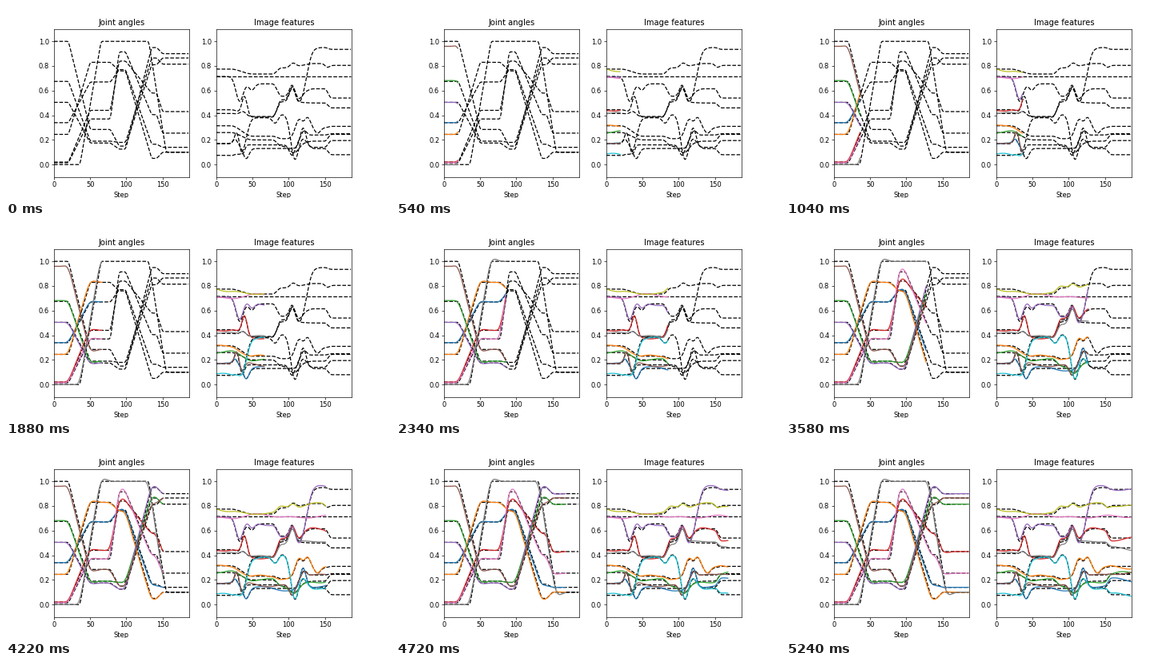
A matplotlib script for the animation above (5.34 s loop, 480 by 240 pixels).

```python
import numpy as np
import matplotlib.pyplot as plt
from matplotlib.animation import FuncAnimation

N = 187
t = np.arange(N)
rng = np.random.default_rng(4)

# Step ranges in which the arm moves; it rests in between.
ARM = (20, 50), (78, 90), (99, 135), (142, 150)
LATE = (36, 65), (131, 155)
VIEW = ARM[:3] + ((150, 159),)


def linear(u):
    return u


def smooth(u):
    return u * u * (3 - 2 * u)


def track(poses, spans, ease):
    """Go from pose to pose, one span per move, with soft corners."""
    y = np.full(N, float(poses[0]))
    for (a, b), p, q in zip(spans, poses, poses[1:]):
        y += (q - p) * ease(np.clip((t - a) / (b - a), 0, 1))
    win = np.hanning(7)[1:-1]
    return np.convolve(np.pad(y, 2, mode="edge"), win / win.sum(), "valid")


def joint(*poses, spans=ARM, start=0):
    goal = track(poses, spans, linear)
    offset = start * (1 - smooth(np.clip((t - 8) / 40, 0, 1)))
    return goal, spring(goal) + offset


def spring(goal, omega=.25, zeta=.6):
    """Follow the goal with a little overshoot, its lag taken out."""
    lag = round(2 * zeta / omega)
    pos, vel, out = goal[0], 0, []
    for g in np.pad(goal, (0, lag), mode="edge"):
        vel += omega ** 2 * (g - pos) - 2 * zeta * omega * vel
        pos += vel
        out.append(pos)
    return np.array(out[lag:])


def feature(*poses, bumps=()):
    """Poses plus bumps given as (centre, width, height)."""
    goal = track(poses, VIEW, smooth)
    for c, w, h in bumps:
        goal += h * np.exp(-((t - c) / w) ** 2 / 2)
    return goal, goal + wander()


def wander(size=.008):
    """Slow random error."""
    phase = rng.uniform(0, 2 * np.pi, 3)
    return size * sum(np.sin(t / (8 + 6 * i) + p) for i, p in enumerate(phase))


joints = [
    joint(.34, .67, .77, .165, .14),
    joint(.245, .83, .76, .05, .10),
    joint(.675, .19, .18, .865, .815, start=.007),
    joint(.02, .44, .84, .58, .43),
    joint(.505, .175, .125, .95, .90),
    joint(1, .285, .15, .81, .865, start=-.04),
    joint(.015, .37, .915, .405, .255),
    joint(0, 1, .1, spans=LATE),
]

features = [
    feature(.17, .13, .13, .14, .195, bumps=[(26, 3, .04), (41, 4, -.09), (120, 4, .16)]),
    feature(.315, .23, .21, .30, .31, bumps=[(114, 5, .12), (126, 4, .09), (140, 4, -.045)]),
    feature(.26, .20, .15, .19, .245, bumps=[(108, 6, -.06)]),
    feature(.445, .385, .525, .615, .54, bumps=[(39, 3.5, .15), (105, 4, .1), (115, 4, -.03)]),
    feature(.715, .655, .555, .95, .935,
            bumps=[(32, 5, -.18), (49, 4, -.05), (105, 4, .12), (118, 8, -.23)]),
    feature(.17, .16, .16, .24, .25,
            bumps=[(28, 3, .09), (36, 3, -.08), (105, 4, -.09), (121, 4, .06)]),
    feature(.715, .715),
    feature(.415, .39, .51, .50, .46, bumps=[(37, 4, .03), (105, 4, .11)]),
    feature(.775, .735, .785, .82, .805, bumps=[(106, 4, .035), (153, 3, -.025)]),
    feature(.075, .38, .41, .13, .08, bumps=[(37, 6, -.14), (82, 4, -.05), (108, 5.5, -.32)]),
]

fig, axes = plt.subplots(1, 2, figsize=(8, 4), dpi=60)
paths = []

for ax, title, data in zip(axes, ("Joint angles", "Image features"), (joints, features)):
    ax.set(title=title, xlabel="Step")
    for goal, _ in data:
        ax.plot(t, goal, "k--")
    for _, path in data:
        line, = ax.plot([], [])
        paths.append((line, path))
    ax.set_xticks(range(0, N, 50))
    ax.set(xlim=(0, N), ylim=(-.1, 1.1))

# Every tenth step and the last one rest for five ticks.
steps = [k for k in range(N) for _ in range(5 if k % 10 == 5 or k == N - 1 else 1)]


def update(tick):
    n = steps[tick] + 1
    for line, y in paths:
        line.set_data(t[:n], y[:n])
    return [line for line, _ in paths]


anim = FuncAnimation(fig, update, frames=len(steps), interval=20,
                     repeat=True, repeat_delay=0, blit=False)
plt.show()
```
